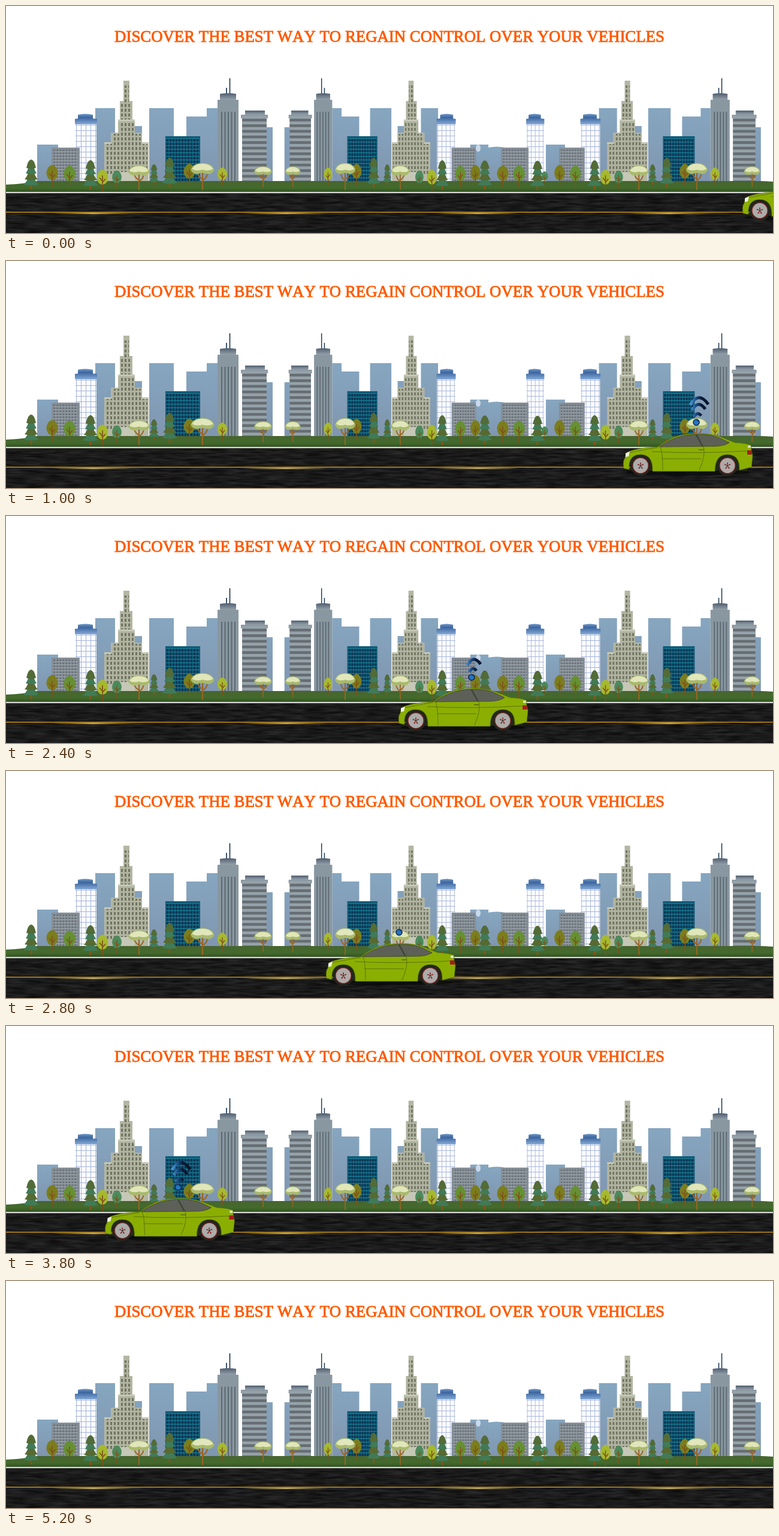
These frames come from a looping animation (1280 px wide and 380 px high, 5400 ms). An HTML page:

```html
<!DOCTYPE html>
<html lang="en">
<head>
<meta charset="utf-8">
<title>City drive</title>
<style>
html, body { margin: 0; width: 100%; height: 100%; overflow: hidden; background: #fff; }
svg { display: block; width: 1280px; height: 380px; }
text { font: 26.8px "Liberation Serif", "Times New Roman", serif; font-kerning: none; fill: #ff5a00; stroke: #ff5a00; stroke-width: .9; text-anchor: middle; }
.wave path { fill: none; stroke: url(#signal); stroke-width: 5; }
</style>
</head>
<body>
<svg viewBox="0 0 1280 380">
<defs>
  <linearGradient id="haze" x2="0" y2="1"><stop stop-color="#86a6c0"/><stop offset="1" stop-color="#8096b0"/></linearGradient>
  <linearGradient id="cap" x2="0" y2="1"><stop stop-color="#7098c8"/><stop offset=".35" stop-color="#3d669f"/><stop offset="1" stop-color="#83a9d6"/></linearGradient>
  <linearGradient id="steel" x2="0" y2="1"><stop stop-color="#505e70"/><stop offset="1" stop-color="#95a1aa"/></linearGradient>
  <linearGradient id="grass" x2="0" y2="1"><stop stop-color="#47652f"/><stop offset=".6" stop-color="#436a2c"/><stop offset="1" stop-color="#305020"/></linearGradient>
  <linearGradient id="glow"><stop stop-color="#c9a646" stop-opacity="0"/><stop offset=".5" stop-color="#d9bf72"/><stop offset="1" stop-color="#c9a646" stop-opacity="0"/></linearGradient>
  <linearGradient id="signal" gradientUnits="userSpaceOnUse" x1="-12" x2="20"><stop stop-color="#5aa8ea"/><stop offset=".35" stop-color="#1c4f8c"/><stop offset=".6" stop-color="#0c1c38"/><stop offset="1" stop-color="#0a1426"/></linearGradient>
  <pattern id="office" x="79" y="240" width="5" height="5" patternUnits="userSpaceOnUse"><path fill="#929aa1" d="M0 0h5v5H0z"/><path fill="#6c747d" d="M0 0h3.6v3H0z"/></pattern>
  <pattern id="glass" x="117" y="199" width="8" height="9" patternUnits="userSpaceOnUse"><path fill="#fbfcff" d="M0 0h8v9H0z"/><path stroke="#a4b3d8" fill="none" d="M.5 0v9M0 .5h8"/></pattern>
  <pattern id="stone" x="167" y="195" width="6" height="8" patternUnits="userSpaceOnUse"><path fill="#b0b39f" d="M0 0h6v8H0z"/><path fill="#6f7460" d="M1 1h3v5H1z"/></pattern>
  <pattern id="teal" x="267" y="221" width="5" height="6" patternUnits="userSpaceOnUse"><path fill="#167d95" d="M0 0h5v6H0z"/><path fill="#0b3452" d="M.5 1.4h4v4.6h-4z"/></pattern>
  <pattern id="band" y="188.700" width="9" height="9.4" patternUnits="userSpaceOnUse"><path fill="#95a2aa" d="M0 0h9v9.4H0z"/><path fill="#666d72" d="M0 0h9v4.6H0z"/></pattern>
  <filter id="asphalt" x="0" y="0" width="1" height="1" color-interpolation-filters="sRGB">
    <feTurbulence type="fractalNoise" baseFrequency=".03 .28" numOctaves="3" seed="4"/>
    <feColorMatrix values=".18 0 0 0 .015  .18 0 0 0 .015  .18 0 0 0 .015  0 0 0 0 1"/>
  </filter>

  <path id="low" fill="url(#haze)" d="M52 232h35v61H52z"/>
  <g id="block"><path fill="#878f97" d="M76 237h47v56H76z"/><path fill="url(#office)" d="M79 240h41v53H79z"/></g>
  <g id="white">
    <path fill="url(#glass)" d="M116 198h35v95h-35z"/>
    <path fill="url(#cap)" d="M120 182q12-3 25 0v7h-25zM115 189q18-3 37 0v9h-37z"/>
  </g>
  <g id="city">
    <path fill="url(#haze)" d="M149 171h33v122h-33zM214 201h13v92h-13zM239 171h41v122h-41zM301 185h34v-14h18v122h-52zM434 203h11v90h-11z"/>
    <use href="#low"/><use href="#white"/><use href="#block"/>
    <path fill="#b4b7a4" d="M196 125h10v34h5v31h4v22h12v16h11v65h-74v-65h11v-16h12v-22h3v-31h6z"/>
    <path fill="url(#stone)" d="M197 133h8v28h4v32h4v21h12v16h11v52h-70v-52h11v-16h12v-21h3v-32h5z"/>
    <path fill="#c5c8b6" d="M190 278h25v15h-25zM187 190h28v3h-28zM164 228h12v3h-12zM227 228h11v3h-11z"/>
    <path fill="#0e5a75" d="M266 218h58v75h-58z"/><path fill="url(#teal)" d="M267 221h56v72h-56z"/>
    <path stroke="#1d3854" stroke-width="1.7" d="M373.5 121v27M368 137v11"/>
    <path fill="#8997a0" d="M353 157h35v136h-35z"/>
    <path fill="url(#steel)" d="M357 147q14-2 27 0v10h-27z"/>
    <path stroke="#5c6972" stroke-width="2" d="M360 177v116M365.5 177v116M371 177v116M376.5 177v116M382 177v116"/>
    <path fill="#8c99a2" d="M392 182h45v6h-2v105h-41V188h-2z"/><path fill="url(#steel)" d="M399 175h33v7h-33z"/>
    <path fill="url(#band)" d="M394 184h41v109h-41z"/>
  </g>

  <g id="pine">
    <path fill="#87551b" d="M-1.5-9h3V0h-3z"/>
    <path fill="#417a56" d="M-13-8Q-5-14-3-27H3Q5-14 13-8Q0-5-13-8z"/>
    <path fill="#566a32" d="M-11-17Q-5-23-3-36H3Q5-23 11-17Q0-14-11-17z"/>
    <path fill="#417a56" d="M-9-27Q-5-32-3-44H3Q5-32 9-27Q0-24-9-27z"/>
    <path fill="#526b37" d="M-8-36Q-5-50 0-50Q5-50 8-36Q0-33-8-36z"/>
  </g>
  <g id="leaf">
    <path d="M0-37C7-35 10-28 9.500-22Q8-12 0-11Q-8-12-9.500-22C-10-28-7-35 0-37z"/>
    <path stroke="#80521a" stroke-width="1.7" fill="none" d="M0 0v-27M0-15l5-6M0-17l-5-6"/>
  </g>
  <g id="shade">
    <path stroke="#9a6422" stroke-width="2" fill="none" d="M0 0v-27M0-15q6-2 8-11M0-17q-6-2-8-9"/>
    <path fill="#a9ba6c" d="M-18-31Q-14-41 0-41T18-31Q16-25 8-24Q0-28-8-24Q-16-25-18-31z"/>
    <path fill="#e1e6bb" d="M-16-32Q-12-40 0-40T16-32Q9-28 0-31Q-9-28-16-32z"/>
  </g>
  <g id="olive" fill="#7b7d1d"><use href="#leaf"/></g>
  <g id="green" fill="#669032"><use href="#leaf"/></g>
  <g id="lime" fill="#a6b92d"><use href="#leaf"/></g>
  <g id="mint" fill="#4b8a5c"><use href="#leaf"/></g>
  <g id="trees"></g>

  <g id="wheel">
    <circle r="17" fill="#24251f"/>
    <circle r="13" fill="#acacaa" stroke="#8d2823" stroke-width="1.2"/>
    <path stroke="#8b2020" stroke-width="1.8" d="M0-2v-3M2-1l3-1M1 2l2 3M-1 2l-2 3M-2-1l-3-1"/>
    <circle r="1.600" fill="#333"/>
  </g>
</defs>

<text x="640" y="60">DISCOVER THE BEST WAY TO REGAIN CONTROL OVER YOUR VEHICLES</text>

<path fill="url(#haze)" d="M804 237q15-3 29 0v56h-29z"/>
<use href="#white" transform="translate(773.7) scale(.82 1)"/>
<use href="#block" transform="translate(751.5) scale(.98 1)"/>
<use href="#city"/>
<use href="#city" transform="translate(850.1) scale(-.866 1)"/>
<use href="#city" transform="translate(853.5) scale(.913 1)"/>
<ellipse cx="788" cy="238" rx="4" ry="6" fill="#c8d9ea"/>

<path fill="url(#grass)" d="M0 299Q30 298 52 293H1260L1280 294V312H0z"/>
<use href="#trees"/>
<use href="#trees" transform="translate(850.1) scale(-.866 1)"/>
<use href="#trees" transform="translate(853.5) scale(.913 1)"/>
<g id="extra"></g>

<path fill="#1b1b1b" d="M0 311h1280v69H0z"/>
<path filter="url(#asphalt)" d="M0 314h1280v66H0z"/>
<path fill="#f2f2f2" d="M0 311.300h1280v2H0z"/>
<path fill="#c38e12" d="M0 344.500h1280v1.500H0z"/>
<g id="dashes" fill="url(#glow)"></g>

<g id="car">
  <ellipse cx="108" cy="354" rx="104" ry="5" fill="#080808" opacity=".65"/>
  <path fill="#252a13" d="M12 326h195v25H12z"/>
  <path fill="#8bae02" stroke="#5f7809" stroke-width=".8" d="M1 347Q-1 335 3 330L5 321Q20 313 58 311Q83 292 105 290Q139 286 161 294L186 304Q204 305 213 308L214 318L216 326L214 345L194 350Q195 324 174 324T153 352H49Q50 324 29 324T10 349z"/>
  <path fill="#5d6057" stroke="#444a32" d="M60 311Q81 296 103 292Q137 287 158 295L177 304Q170 309 156 310z"/>
  <path fill="#41453a" d="M120 290h3l11 20h-3z"/>
  <path fill="none" stroke="#5c740a" d="M62 312Q66 319 66 350M134 311Q138 325 127 350M48 319Q120 323 207 318M64 331H130M9 321Q34 316 58 312"/>
  <path fill="#63780e" d="M126 315h9v2h-9z"/>
  <path fill="#eef2e8" d="M4 322l7-3-2 8-5 1z"/>
  <path fill="#a51d1b" d="M207 317h7l1 7h-8z"/>
  <path fill="#d9dfbd" d="M208 309h5v4h-5z"/>
  <use href="#wheel" x="29" y="342.500"/><use href="#wheel" x="174" y="342.500"/>
  <g class="wave" transform="translate(122 270)">
    <circle r="5" fill="#2474c4" stroke="#0c2547" stroke-width="1.5"/>
    <path d="M-3-3Q0-6 4-2" style="stroke-width:2"/>
    <path class="bar" d="M-4-9Q2-19 8-11"/>
    <path class="bar" d="M-7-20Q3-39 15-22"/>
    <path class="bar" d="M-10-29Q4-53 20-30"/>
  </g>
</g>
</svg>
<script>
const $ = id => document.getElementById(id);
const tree = ([kind, x, y, s]) =>
  `<use href="#${kind}" transform="translate(${x} ${y}) scale(${s})"/>`;

$('trees').innerHTML = [
  ['olive', 306, 300, .98], ['olive', 77, 303, 1], ['green', 106, 305, 1.03],
  ['pine', 141, 308, 1], ['lime', 161, 310, .98], ['mint', 185, 306, .83],
  ['shade', 222, 308, 1], ['pine', 247, 299, .68], ['pine', 273, 304, 1],
  ['shade', 328, 308, 1.1], ['lime', 361, 301, .83], ['shade', 429, 303, .84]
].map(tree).join('');

$('extra').innerHTML = [
  ['pine', 42, 307, 1], ['pine', 799, 307, .97], ['mint', 899, 299, .6],
  ['pine', 887, 308, .98], ['olive', 829, 304, 1], ['green', 856, 305, 1.03]
].map(tree).join('');

$('dashes').innerHTML = [65, 387, 707, 1027].map(x =>
  `<path d="M${x} 347l25-.7h110l26 .7-26 1.300h-110z"/>`).join('');

// [step, left edge of the car]
const keys = [[0, 1229], [5, 1030], [6, 984], [9, 809], [12, 655], [14, 534], [15, 480],
  [16, 330], [17, 279], [18, 233], [21, 30], [24, -157], [26, -260]];

function carX(step) {
  const k = Math.max(1, keys.findIndex(key => key[0] >= step));
  const [a, x] = keys[k - 1], [b, end] = keys[k];
  return x + (end - x) * (step - a) / (b - a);
}

const bars = [...document.querySelectorAll('.bar')];

function draw() {
  const step = Math.floor(performance.now() % 5400 / 200);
  const level = (step + (step < 16 ? 2 : 0)) % 4;
  $('car').setAttribute('transform', `translate(${carX(step)})`);
  bars.forEach((bar, i) => bar.style.display = i < level ? '' : 'none');
  requestAnimationFrame(draw);
}
draw();
</script>
</body>
</html>
```
